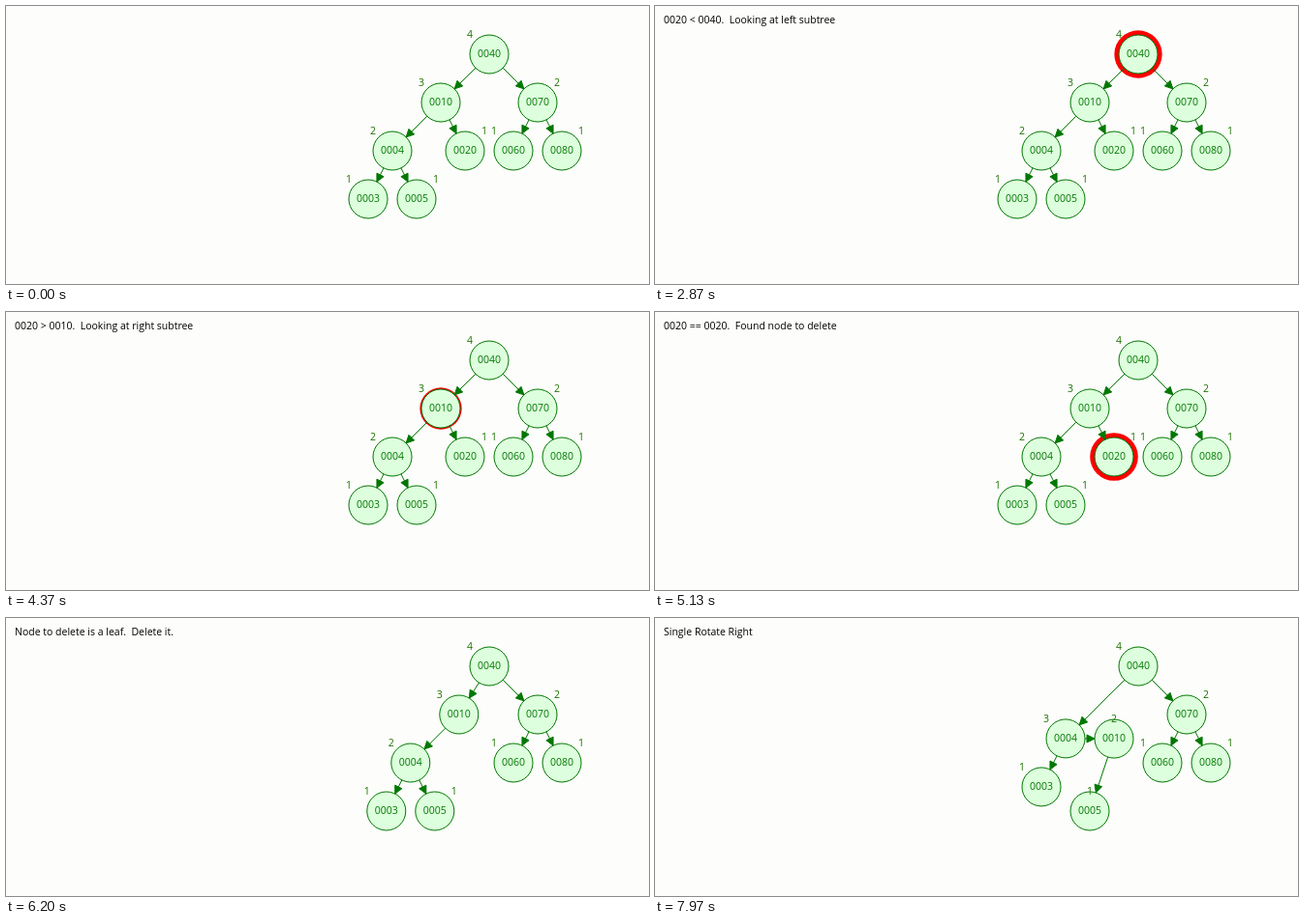
Recreate the animation shown at these times as an HTML page. Size 664 by 288 pixels, loop 8000 ms.

```html
<!DOCTYPE html>
<html lang="en">
<head>
<meta charset="utf-8">
<title>AVL tree: delete</title>
<style>
  html, body { margin: 0; width: 664px; height: 288px; overflow: hidden; background: #fdfdfb; }
  svg { display: block; }
  text { font: 10.5px "Open Sans", "Noto Sans", sans-serif; white-space: pre; text-anchor: middle; fill: #007700; }
  .message { text-anchor: start; fill: #000; }
  .label { fill: #1c7300; }
  .node { fill: #ddffdd; stroke: #007700; }
  .edge { stroke: #007700; fill: #007700; }
  .hot { stroke: #d01400; fill: #d01400; }
  .cursor { fill: none; stroke: #007700; stroke-width: 4; }
</style>
</head>
<body>
<svg id="stage" width="664" height="288" viewBox="0 0 664 288"></svg>
<script>
const LOOP = 8000, STEP = 660, RADIUS = 20;
const FOUND = 5050, REMOVE = 5705, ROTATE = 7640;

const MESSAGES = [
  [0, ''],
  [1800, 'Deleting 0020'],
  [2430, '0020 < 0040.  Looking at left subtree'],
  [3735, '0020 > 0010.  Looking at right subtree'],
  [FOUND, '0020 == 0020.  Found node to delete'],
  [REMOVE, 'Node to delete is a leaf.  Delete it.'],
  [6400, ''],
  [7000, 'Single Rotate Right']
];

// key: [x, y, height, side of the height label]
const TREE = {
  40: [499, 50, 4, -1], 10: [449, 100, 3, -1], 70: [549, 100, 2, 1],
  4: [399, 150, 2, -1], 20: [474, 150, 1, 1], 60: [524, 150, 1, -1],
  80: [574, 150, 1, 1], 3: [374, 200, 1, -1], 5: [424, 200, 1, 1]
};

const HIGHLIGHTS = [[2430, 3074, 40], [3735, 4390, 10], [FOUND, REMOVE, 20]];
const CURSORS = [[3074, 40, 10], [4390, 10, 20]];

const stage = document.getElementById('stage');
const progress = (t, start) => Math.min(1, Math.max(0, (t - start) / STEP));
const mix = (a, b, p) => a + (b - a) * p;
const round = v => v.toFixed(2);
const escapeText = s => s.replace(/</g, '&lt;').replace(/>/g, '&gt;');

const text = (x, y, s, cls = '') =>
  `<text x="${round(x)}" y="${round(y)}" class="${cls}">${escapeText(s)}</text>`;
const circle = (x, y, r, cls) =>
  `<circle cx="${round(x)}" cy="${round(y)}" r="${round(r)}" class="${cls}"/>`;

// Triangle wave between 0 and 5
function pulse(t) {
  const phase = (((t - 5090) / 2150) % 1 + 1) % 1;
  return Math.abs(phase * 10 - 5);
}

function treeAt(t) {
  const shift = 25 * progress(t, REMOVE);
  const turn = progress(t, ROTATE);
  const nodes = {};
  for (const key in TREE) {
    const [x, y, height, side] = TREE[key];
    nodes[key] = { x, y, height, side };
  }
  for (const key of [10, 4, 3, 5]) nodes[key].x += shift;
  if (t >= REMOVE) delete nodes[20];
  if (t >= ROTATE) {
    nodes[10].y = mix(100, 150, turn);
    nodes[4].y = mix(150, 100, turn);
    nodes[3].y = mix(200, 150, turn);
    nodes[10].side = mix(-1, 1, turn);
    nodes[5].side = mix(1, -1, turn);
    nodes[10].height = 2;
    nodes[4].height = 3;
  }
  return nodes;
}

function edgesAt(t) {
  const links = [[40, 70], [70, 60], [70, 80], [4, 3]];
  if (t >= ROTATE) return links.concat([[40, 4], [4, 10], [10, 5]]);
  links.push([40, 10], [10, 4], [4, 5]);
  if (t < REMOVE) links.push([10, 20]);
  return links;
}

function arrow(a, b, cls, width) {
  const dx = b.x - a.x, dy = b.y - a.y, d = Math.hypot(dx, dy);
  const ux = dx / d, uy = dy / d;
  const at = (from, along, across = 0) =>
    `${round(from.x + ux * along - uy * across)} ${round(from.y + uy * along + ux * across)}`;
  const tip = at(b, -RADIUS);
  return `<path class="${cls}" stroke-width="${round(width)}" d="M${at(a, RADIUS)}L${tip}` +
    `M${tip}L${at(b, -RADIUS - 8, 4)}L${at(b, -RADIUS - 8, -4)}Z"/>`;
}

function render(t) {
  const nodes = treeAt(t);
  const glow = pulse(t);
  let out = text(9, 18, MESSAGES.filter(m => t >= m[0]).pop()[1], 'message');

  for (const [start, end, key] of HIGHLIGHTS) {
    if (t >= start && t < end) {
      out += `<circle cx="${nodes[key].x}" cy="${nodes[key].y}" r="${round(RADIUS + glow)}" fill="#f00"/>`;
    }
  }
  for (const key in nodes) {
    const n = nodes[key];
    out += circle(n.x, n.y, RADIUS, 'node') + text(n.x, n.y + 3.4, key.padStart(4, '0'));
  }
  for (const key in nodes) {
    const n = nodes[key];
    out += text(n.x + 20 * n.side, n.y - 16.6, String(n.height), 'label');
  }
  for (const [from, to] of edgesAt(t)) {
    const a = nodes[from], b = nodes[to];
    if (from === 10 && to === 4 && t >= 7000) out += arrow(a, b, 'hot', glow);
    out += arrow(a, b, 'edge', 1);
  }
  for (const [start, from, to] of CURSORS) {
    if (t < start || t >= start + STEP) continue;
    const p = progress(t, start), a = nodes[from], b = nodes[to];
    out += circle(mix(a.x, b.x, p), mix(a.y, b.y, p), RADIUS, 'cursor');
  }
  stage.innerHTML = out;
}

const begin = performance.now();
function tick() {
  render((performance.now() - begin) % LOOP);
  requestAnimationFrame(tick);
}
render(0);
requestAnimationFrame(tick);
</script>
</body>
</html>
```
